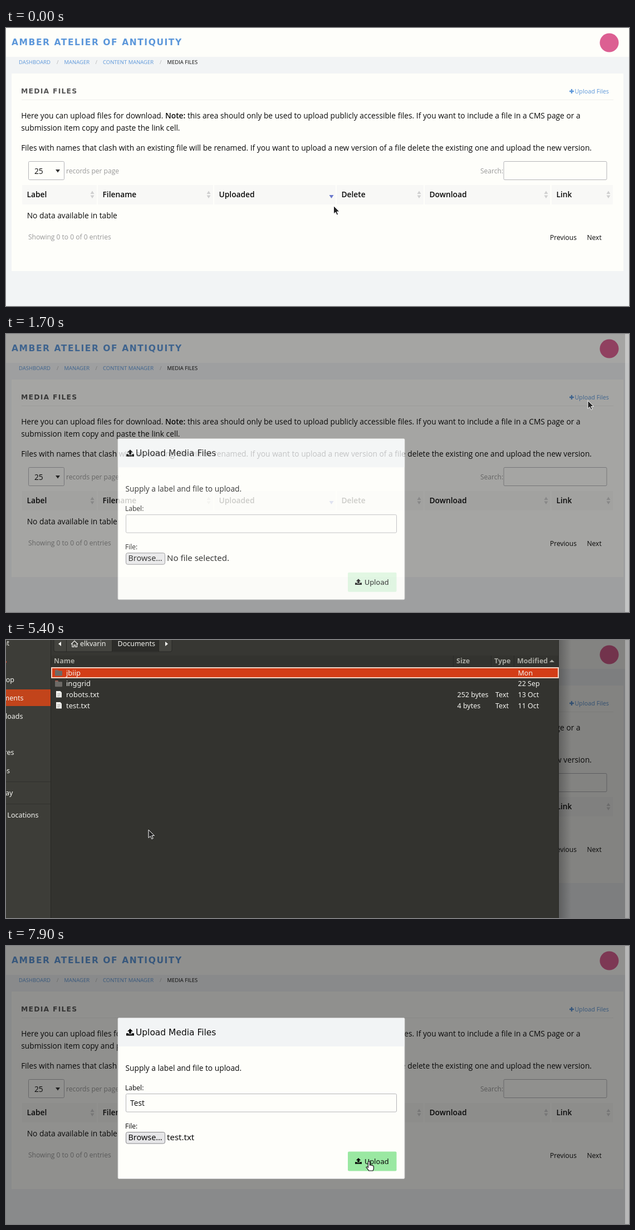
Write an HTML page that moves like this. It is 1119 by 501 pixels and loops after 8 s.

```html
<!DOCTYPE html>
<html lang="en">
<head>
<meta charset="utf-8">
<title>Media files</title>
<style>
html, body { margin: 0; width: 100%; height: 100%; overflow: hidden; background: #f2f4f5; }
svg { display: block; width: 1119px; height: 501px; font: 13.77px "Open Sans", "Noto Sans", sans-serif; fill: #0a0a0a; }
text { white-space: pre; }
.wide { font-family: "DejaVu Sans", sans-serif; }
.caps { font-weight: bold; letter-spacing: .1em; }
.small { font-size: 12.05px; }
.mute { fill: #999; }
.link { fill: #5c97da; }
.crumb { font-size: 9.47px; }
.head { font-weight: 600; }
.ui { font-family: "Noto Sans", "Open Sans", sans-serif; font-size: 12.5px; }
.box { fill: #fefefa; stroke: #b4b4b8; }
.paper { fill: #fefefa; }
</style>
</head>
<body>
<svg viewBox="0 0 1119 501">
  <defs>
    <path id="arrow" d="M0 0V14.5L3.4 11.4L5.8 16.6L8.2 15.5L5.9 10.5H10.4Z" fill="#222" stroke="#fff" stroke-width="1"/>
    <path id="hand" d="M-1.6 1Q0-1.4 1.4 1V7Q3 5.6 4 7.3Q5.6 6.2 6.4 8Q8.2 7.4 8.4 9.6V13Q8.2 15 7 17H-.4Q-2 14-5 10.8Q-4.6 8.6-1.6 11Z" fill="#fff" stroke="#111" stroke-width="1.2"/>
    <path id="upload" d="M7 0L12 5H9V9H5V5H2ZM0 8.3H4V10H10V8.3H14V12.5H0Z"/>
    <path id="folder" d="M0 1Q0 0 1 0H5L6.500 2H12Q13 2 13 3V10Q13 11 12 11H1Q0 11 0 10Z"/>
    <linearGradient id="shade">
      <stop offset="0" stop-opacity=".25"/><stop offset="1" stop-opacity="0"/>
    </linearGradient>
  </defs>

  <g id="page">
    <rect width="1119" height="501" fill="#f2f4f5"/>
    <rect width="1119" height="52" class="paper"/>
    <rect x="10" y="82" width="1099" height="356" class="paper"/>
    <text x="10" y="31" class="wide caps link" font-size="15.5">AMBER ATELIER OF ANTIQUITY</text>
    <circle cx="1083.500" cy="26.500" r="17" fill="#dc5f92"/>
    <g class="crumb link">
      <text x="23" y="65">DASHBOARD</text>
      <text x="104.500" y="65">MANAGER</text>
      <text x="174" y="65">CONTENT MANAGER</text>
      <text x="289.500" y="65" fill="#0a0a0a">MEDIA FILES</text>
      <g fill="#b5b5b5"><text x="91" y="65">/</text><text x="160.500" y="65">/</text><text x="276" y="65">/</text></g>
    </g>
    <text x="27" y="118" class="wide caps" font-size="12.39" fill="#555">MEDIA FILES</text>
    <path d="M28 129.500H1091" stroke="#efefec"/>
    <path d="M1012 114H1020M1016 110V118" stroke="#5c97da" stroke-width="2.4"/>
    <text x="1021.500" y="118" class="link" font-size="10.8">Upload Files</text>
    <text x="27.200" y="163">Here you can upload files for download. <tspan class="head">Note:</tspan></text>
    <text x="326" y="163">this area should only be used to upload publicly accessible files. If you want to include a file in a CMS page or a</text>
    <text x="27.200" y="185">submission item copy and paste the link cell.</text>
    <text x="27.200" y="221">Files with names that clash with an existing file will be renamed. If you want to upload a new version of a file delete the existing one and upload the new version.</text>
    <rect x="40.500" y="240.500" width="64" height="33" rx="2" class="box"/>
    <text x="51" y="263">25</text>
    <path d="M89 255H97L93 260.500Z" fill="#333"/>
    <g class="small mute">
      <text x="108" y="262">records per page</text>
      <text x="852" y="262">Search:</text>
      <text x="40" y="380.500">Showing 0 to 0 of 0 entries</text>
    </g>
    <rect x="894" y="240.500" width="185" height="33" rx="2" class="box"/>
    <g id="columns"></g>
    <text x="37.700" y="342.500">No data available in table</text>
    <text x="977" y="382" class="small">Previous</text>
    <text x="1043.500" y="382" class="small">Next</text>
  </g>

  <g id="overlay">
    <rect width="1112" height="501" fill="#0a0a0a" opacity=".45"/>
    <rect x="1112" width="7" height="501" fill="#b8b8b8"/>
    <g id="modal">
      <rect x="201" y="129.500" width="515" height="290" rx="2" class="paper" stroke="#c8c8c8"/>
      <rect x="201.500" y="130" width="514" height="51" fill="#f2f4f5"/>
      <use href="#upload" x="216" y="149"/>
      <text x="233" y="161" class="wide" font-size="15.46">Upload Media Files</text>
      <text x="214.500" y="224.500">Supply a label and file to upload.</text>
      <text x="214" y="260" class="small">Label:</text>
      <rect x="213.500" y="264.500" width="490" height="36" rx="3" fill="#cacaca" id="glow"/>
      <rect x="215.500" y="266.500" width="486" height="32.500" rx="2" class="box" id="field"/>
      <text x="223" y="288" id="label"></text>
      <path d="M0 275V291" stroke="#111" id="caret"/>
      <text x="214" y="329" class="small">File:</text>
      <rect x="215.500" y="335.500" width="70" height="20.500" rx="3" stroke="#88888c" id="browse"/>
      <text x="219.500" y="350" class="ui" style="font-size:14.4px">Browse…</text>
      <text x="289" y="350" class="ui" style="font-size:15px" id="file"></text>
      <rect x="614" y="370.500" width="87.500" height="35" rx="2" id="send"/>
      <use href="#upload" transform="translate(627 382) scale(.86)"/>
      <text x="644" y="392.500" class="wide" font-size="12.5">Upload</text>
      <g id="menu" class="ui" fill="#fff"><rect x="214" y="299" width="487" height="107" fill="#32322e"/></g>
    </g>
  </g>

  <rect width="1119" height="501" fill="#000" id="dim"/>

  <g id="dialog" class="ui" fill="#f4f4f0">
    <rect x="993" y="-73" width="22" height="860" fill="url(#shade)"/>
    <rect x="-20" y="-73" width="1013" height="860" fill="#33332f"/>
    <rect x="-20" y="-73" width="100" height="860" fill="#3d3d38"/>
    <rect x="81" y="-73" width="912" height="101" fill="#373733"/>
    <rect x="86" y="-10" width="212" height="31" rx="3" fill="#44443f" stroke="#292926"/>
    <rect x="190" y="-10" width="85" height="30.500" fill="#2c2c29"/>
    <path d="M108.500 0V21M190.500 0V21M274.500 0V21M80.500-73V787M992.500-73V787" stroke="#282825"/>
    <path d="M99 3V11L94 7ZM286 3V11L291 7Z"/>
    <path d="M117 7.500L123 1.500L129 7.500M119 6.500V12.500H122V9H124.500V12.500H127.500V6.500" fill="none" stroke="#f4f4f0" stroke-width="1.2"/>
    <text x="133" y="11">elkvarin</text>
    <text x="200.500" y="11">Documents</text>
    <g font-weight="bold" fill="#a9a9a2">
      <text x="86" y="42">Name</text><text x="809" y="42">Size</text><text x="877" y="42">Type</text><text x="918" y="42">Modified</text>
      <path d="M976 40H985L980.500 35.500Z"/>
    </g>
    <path d="M803.500 28V48M871.500 28V48M912.500 28V48" stroke="#2a2a27"/>
    <rect x="82" y="50" width="910" height="18" fill="#d33d17" stroke="#f4d4c4" stroke-width="2" id="pick"/>
    <g id="rows"></g>
    <rect x="-20" y="89" width="100" height="30" fill="#c2441b"/>
    <rect x="0" y="38" width="1" height="3" fill="#d9452c"/>
    <path d="M0 255.500H80M0 295.500H80" stroke="#31312d"/>
    <g id="places" text-anchor="end"></g>
  </g>

  <use href="#arrow" id="pointer"/>
</svg>

<script>
const $ = id => document.getElementById(id);
const LOOP = 8000, STEP = 100;

// left edge, right edge, sort icon x, title
const columns = [
  [29, 163, 155, "Label"], [165, 372, 364, "Filename"], [374, 592, 584.5, "Uploaded"],
  [594, 750, 742, "Delete"], [752, 977, 970, "Download"], [980, 1090, 1082, "Link"]
];
$("columns").innerHTML = columns.map(([a, b, s, name]) => {
  const icon = name === "Uploaded"
    ? `<path d="M${s - 4} 301h8l-4 6z" fill="#6a78cc"/>`
    : `<path d="M${s - 3.5} 299h7l-3.500-5.500zm0 2.500h7l-3.500 5.500z" fill="#cfcfcf"/>`;
  return `<rect x="${a}" y="283" width="${b - a}" height="35" fill="#f8f8f6"/>${icon}
    <text class="head" x="${a + 8.5}" y="304.500">${name}</text>`;
}).join("");

$("menu").innerHTML += ["Test", "Test 2", "Test 3", "TEST", "Test HTML", "Janeway default (latest)"]
  .map((s, i) => `<text x="220.500" y="${315 + i * 17.2}">${s}</text>`).join("");

const files = [
  ["jbiip", "", "", "Mon"], ["inggrid", "", "", "22 Sep"],
  ["robots.txt", "252 bytes", "Text", "13 Oct"], ["test.txt", "4 bytes", "Text", "11 Oct"]
];
$("rows").innerHTML = files.map(([name, size, type, date], i) => {
  const y = 63.5 + i * 19.8;
  const icon = size
    ? `<path d="M90 ${y - 11}h7.500l2.500 2.500v9h-10z"/><path d="M92 ${y - 6.5}h6m-6 2.500h6m-6 2h4" stroke="#999" stroke-width=".8"/>`
    : `<use href="#folder" x="88" y="${y - 10}" fill="#6d6a66"/><path d="M88.500 ${y - 9.5}h5" stroke="#c9503c"/>`;
  return `${icon}<text x="108" y="${y}" font-size="13">${name}</text><text x="810.500" y="${y}">${size}</text>
    <text x="879" y="${y}">${type}</text><text x="919.500" y="${y}">${date}</text>`;
}).join("");

const places = [
  ["Recent", 6, 10], ["Desktop", 15, 75.5], ["Documents", 31.5, 108.5], ["Downloads", 30.5, 141.5],
  ["Pictures", 14.5, 206.5], ["Videos", 7, 239.5], ["ay", 12.5, 279.5], ["Locations", 58.5, 320]
];
$("places").innerHTML = places.map(([s, x, y]) => `<text x="${x}" y="${y}">${s}</text>`).join("");

// time, x, y of the pointer tip
const path = [
  [100, 588.5, 320.5], [400, 604, 342], [700, 800, 270], [1000, 1045, 120],
  [2000, 1045, 120], [2100, 940, 160], [2200, 600, 260], [2300, 320, 330], [2400, 241, 347],
  [2500, 241, 347], [3000, 247, 290], [4700, 247, 290], [5000, 256, 342],
  [5400, 256, 342], [5700, 208, 362], [5800, 208, 362], [6400, 159, 120],
  [6800, 159, 120], [7400, 494, 376], [7500, 494, 376], [7900, 652, 388]
];
const fade = [[1310, 0], [1800, 1]];
const dimming = [[5200, 0], [5700, .23], [6800, .23], [7100, 0]];
const opening = [[5100, 0], [5200, .6], [5300, 1], [6700, 1], [6800, .0244], [6900, 0]];
const keys = [3900, 4100, 4200, 4300];

// linear value of a step table at time t
function at(table, t, k = 1) {
  const i = table.findIndex(row => row[0] > t);
  if (i < 0) return table[table.length - 1][k];
  if (i === 0) return table[0][k];
  const a = table[i - 1], b = table[i];
  return a[k] + (b[k] - a[k]) * (t - a[0]) / (b[0] - a[0]);
}
const set = (id, attrs) => {
  for (const k in attrs) $(id).setAttribute(k, attrs[k]);
};
const show = (id, on) => set(id, { visibility: on ? "visible" : "hidden" });

function draw(t) {
  const x = at(path, t, 1), y = at(path, t, 2);
  const over = (l, r, top, bottom) => x >= l && x <= r && y >= top && y <= bottom;

  const p = at(fade, t);
  set("overlay", { opacity: p });
  set("modal", { transform: `translate(0 ${290 * (1 - p)})` });

  const typed = "Test".slice(0, keys.filter(k => k <= t).length);
  const focus = t >= 3000 && t < 5200;
  $("label").textContent = typed;
  $("file").textContent = t >= 6800 ? "test.txt" : "No file selected.";
  set("field", { style: focus ? "stroke:#777" : "" });
  show("glow", focus);
  show("caret", focus);
  set("caret", { transform: `translate(${typed ? 223.5 + $("label").getComputedTextLength() : 223.5} 0)` });
  show("menu", t >= 3900 && t < 4700);

  const ready = over(614, 702, 370, 406);
  set("browse", { fill: over(215, 286, 335, 356) ? "#cfcfd1" : "#e6e6e8" });
  set("send", { fill: ready ? "#9ae8a2" : "#dcf6de" });

  set("dim", { opacity: at(dimming, t) });
  const s = at(opening, t);
  show("dialog", s > 0);
  set("dialog", { transform: `translate(0 357) scale(1 ${s || 1}) translate(0 -357)` });
  set("pick", { y: t >= 6400 ? 109.4 : 50 });

  set("pointer", { href: ready ? "#hand" : "#arrow", transform: `translate(${x} ${y})` });
}

const start = performance.now();
function tick() {
  const t = (performance.now() - start) % LOOP;
  draw(Math.floor(t / STEP) * STEP);
  requestAnimationFrame(tick);
}
tick();
</script>
</body>
</html>
```
